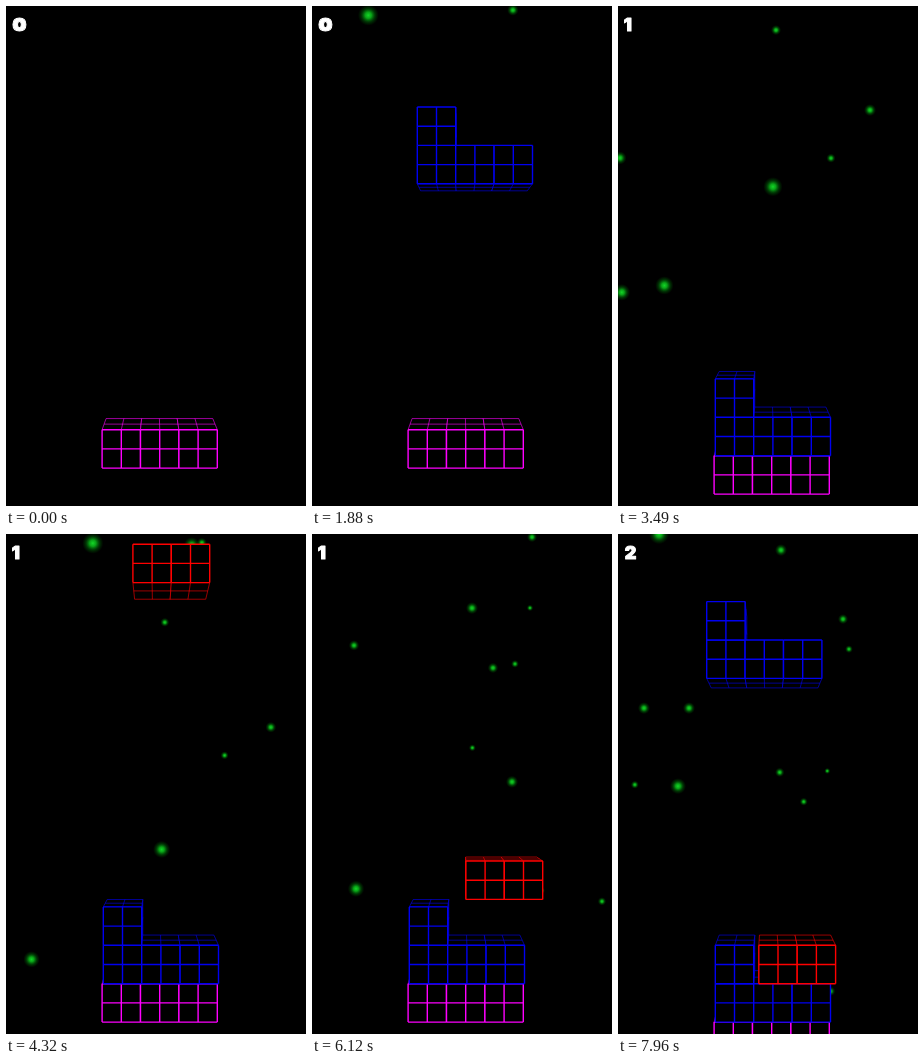
Write an HTML page with a canvas that moves like this. It is 300 by 500 pixels and loops after 8000 ms.

```html
<!DOCTYPE html>
<html lang="en">
<head>
<meta charset="utf-8">
<title>Block stack</title>
<style>
  html, body { margin: 0; width: 100%; height: 100%; overflow: hidden; background: #000; }
  canvas { display: block; }
</style>
</head>
<body>
<canvas id="stage" width="300" height="500"></canvas>
<script>
const ctx = document.getElementById('stage').getContext('2d');
const LOOP = 8000;
const UNIT = 38.4;
const EYE = [150, 273];
const DEPTH_SCALE = 0.926;
const DRAG = 0.08;
const SHRINK = 0.14;

const BAR = [[-1, 0], [0, 0], [1, 0]];
const ELL = [...BAR, [-1, -1]];
const PAIR = [[-0.5, 0], [0.5, 0]];

// Time in s, x, y, velocity x, velocity y, radius
const SPARKS = [
  [2.54, 34, 21, -35, 143, 7.5],
  [2.54, 154, 15, 1, 181, 11],
  [2.54, 18, 60, -38, 140, 8.5],
  [2.54, 206, 67, 7.6, 93, 5.2],
  [2.54, 72, 100, -28, 196, 10.5],
  [2.54, 34, 127, -33, 174, 9.5],
  [3.49, 252, 104, 16, 111, 6],
  [3.49, 158, 24, 1, 80, 5],
  [5.08, 58, 23, -16, 88.5, 6],
  [5.08, 178, 49, 3, 85, 6],
  [5.08, 199, 62, 4, 68, 4.5],
  [5.08, 192, 115, 8, 133, 7],
  [5.08, 68, 161, -24, 194, 9.5],
  [5.08, 213, 9, 5, 65, 3.7],
  [6.12, 160, 74, 1, 96, 6],
  [6.12, 220, 3, 6.4, 65.5, 5],
  [7.96, 41, 0, -20, 170, 10],
  [7.96, 163, 16, 1, 90, 6],
  [7.96, 225, 85, 8, 80, 5],
  [7.96, 26, 174, -20, 110, 6],
  [7.96, 71, 174, -12, 110, 6],
  [7.96, 60, 252, -14, 150, 8]
];

function ramp(t, from, to) {
  const p = Math.min(1, Math.max(0, (t - from) / (to - from)));
  return p * p * (3 - 2 * p);
}

const mix = (a, b, p) => [a[0] + (b[0] - a[0]) * p, a[1] + (b[1] - a[1]) * p];
const toBack = p => mix(EYE, p, DEPTH_SCALE);

function line(a, b) {
  ctx.beginPath();
  ctx.moveTo(...a);
  ctx.lineTo(...b);
  ctx.stroke();
}

function fillQuad(quad) {
  ctx.beginPath();
  quad.forEach(p => ctx.lineTo(...p));
  ctx.closePath();
  ctx.fillStyle = '#000';
  ctx.fill();
}

function grid([a, b, c, d]) {
  for (const p of [0, 0.5, 1]) {
    line(mix(a, b, p), mix(d, c, p));
    line(mix(a, d, p), mix(b, c, p));
  }
}

function drawFront(quad, color) {
  fillQuad(quad);
  ctx.strokeStyle = color;
  ctx.lineWidth = 1.4;
  grid(quad);
}

function drawSide(a, b, color) {
  const quad = [a, b, toBack(b), toBack(a)];
  ctx.save();
  fillQuad(quad);
  ctx.strokeStyle = color;
  ctx.lineWidth = 1;
  ctx.globalAlpha = 0.6;
  grid(quad);
  ctx.clip();
  ctx.globalAlpha = 0.3;
  ctx.lineWidth = 8;
  for (const p of [0, 0.5, 1]) line(mix(a, b, p), mix(quad[3], quad[2], p));
  ctx.restore();
}

const facesEye = (a, b) =>
  (b[1] - a[1]) * (EYE[0] - a[0]) - (b[0] - a[0]) * (EYE[1] - a[1]) > 0;

function cubeFaces({ cells, x, y, turn = 0 }) {
  const cos = Math.cos(turn) * UNIT, sin = Math.sin(turn) * UNIT;
  const place = (u, v) => [x + u * cos - v * sin, y + u * sin + v * cos];
  return cells.map(([u, v]) => [
    place(u - 0.5, v - 0.5), place(u + 0.5, v - 0.5),
    place(u + 0.5, v + 0.5), place(u - 0.5, v + 0.5)
  ]);
}

function drawPieces(pieces) {
  const cubes = pieces.flatMap(piece =>
    cubeFaces(piece).map(quad => ({ quad, color: piece.color })));
  for (const edges of [[1, 3], [0, 2]]) {
    for (const { quad, color } of cubes) {
      for (const i of edges) {
        const a = quad[i], b = quad[(i + 1) % 4];
        if (facesEye(a, b)) drawSide(a, b, color);
      }
    }
  }
  cubes.forEach(({ quad, color }) => drawFront(quad, color));
}

function drawSparks(t) {
  for (const [start, x, y, vx, vy, size] of SPARKS) {
    const dt = t / 1000 - start;
    const travel = (1 - Math.exp(-DRAG * dt)) / DRAG;
    const r = size * Math.exp(-SHRINK * dt);
    const px = x + vx * travel, py = y + vy * travel;
    if (r < 3 || py < -r || py > 500 + r) continue;
    const glow = ctx.createRadialGradient(px, py, 0, px, py, r);
    glow.addColorStop(0, 'rgba(20,215,40,1)');
    glow.addColorStop(0.3, 'rgba(10,180,25,.9)');
    glow.addColorStop(0.65, 'rgba(0,130,10,.4)');
    glow.addColorStop(1, 'rgba(0,100,0,0)');
    ctx.fillStyle = glow;
    ctx.fillRect(px - r, py - r, 2 * r, 2 * r);
  }
}

function drawScore(t) {
  const [label, x, y, size] =
    t < 3260 ? ['o', 13.5, 25, 23] :
    t < 6390 ? ['1', 9.8, 25, 18] : ['2', 12.5, 25, 18];
  ctx.font = `900 ${size}px Inter, sans-serif`;
  ctx.textAlign = 'center';
  ctx.lineJoin = 'round';
  ctx.lineWidth = 1;
  ctx.fillStyle = ctx.strokeStyle = '#fff';
  ctx.fillText(label, x, y);
  ctx.strokeText(label, x, y);
}

function draw(t) {
  const secondScroll = UNIT * ramp(t, 6400, 6650);
  const scroll = 26 * ramp(t, 3270, 3460) + secondScroll;
  const quarter = Math.PI / 2;

  ctx.fillStyle = '#000';
  ctx.fillRect(0, 0, 300, 500);
  drawSparks(t);
  drawPieces([
    { cells: BAR, color: '#f0f', x: 153.7, y: 442.9 + scroll },
    {
      cells: ELL, color: '#0000f0',
      x: 162.9 - 8 * ramp(t, 1900, 2200),
      y: Math.min(38 + 0.1797 * (t - 1210), 404.5) + scroll,
      turn: quarter * (2 + ramp(t, 1400, 1550) + ramp(t, 1700, 1850))
    },
    {
      cells: PAIR, color: '#f00',
      x: 165.3 + 27 * ramp(t, 5300, 5900) - 13.1 * ramp(t, 6150, 6350),
      y: Math.min(163 + 0.176 * (t - 5080), 392.1) + secondScroll
    },
    { cells: ELL, color: '#0000f0', x: 146.3, y: 125 + 0.1785 * (t - 7960) }
  ]);
  drawScore(t);
}

const began = performance.now();
function tick() {
  draw((performance.now() - began) % LOOP);
  requestAnimationFrame(tick);
}
tick();
</script>
</body>
</html>
```
